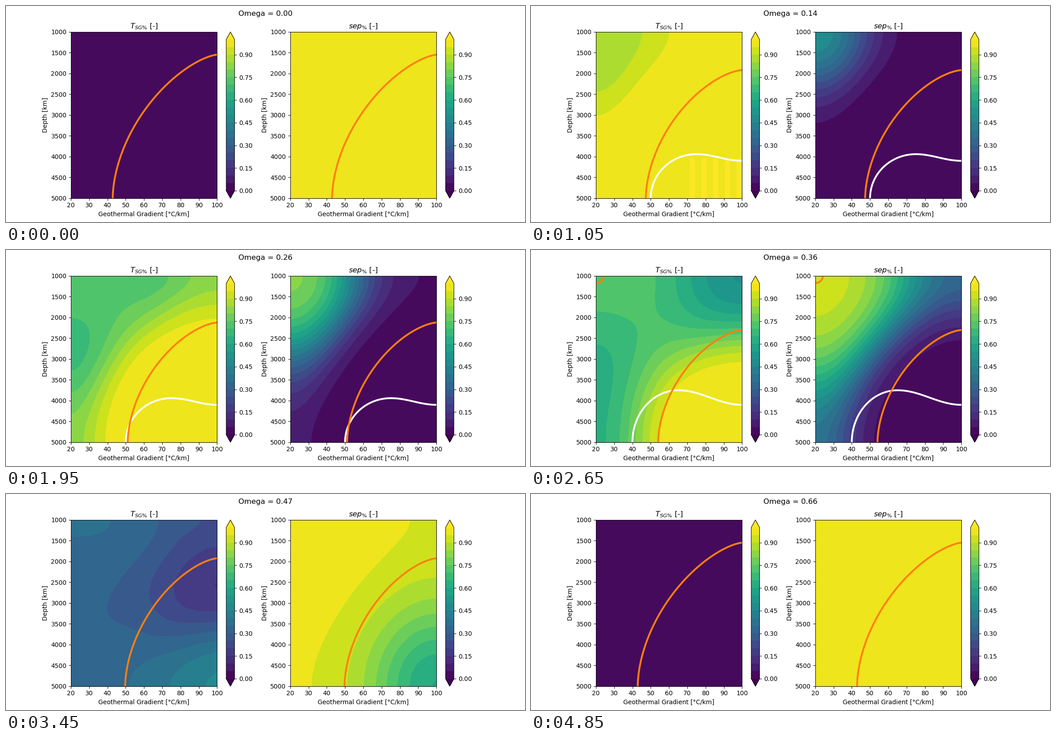
A matplotlib script for the animation above (4950 ms loop, 1159 by 483 pixels).

```python
import numpy as np
import matplotlib.pyplot as plt
from matplotlib.animation import FuncAnimation

DPI = 96.6
STEPS = 98
OMEGA_STEP = 1 / 148
ORANGE = "#ff7f0e"
LEVELS = np.linspace(0, 1, 21)
plt.rcParams["font.size"] = 10.25

u = np.linspace(0, 1, 91)
v = np.linspace(0, 1, 101)
U, V = np.meshgrid(u, v)
G, D = 20 + 80 * U, 1000 + 4000 * V
# Eased coordinates give every surface zero slope at the borders
A, B = (1 - np.cos(np.pi * U)) / 2, (1 - np.cos(np.pi * V)) / 2


def ramp(x, start, end):
    return np.clip((x - start) / (end - start), 0, 1)


def smooth(x, start, end):
    t = ramp(x, start, end)
    return t * t * (3 - 2 * t)


def mix(a, b, t):
    return a + (b - a) * t


def sigmoid(x):
    return 1 / (1 + np.exp(-x))


FLAT = np.full_like(U, 0.02)
residue = U**2 * np.maximum(.092 - .042 * ((1 - V) / .39)**2,
                            .065 - .015 * (V / .0825)**2)
residue = np.maximum(residue, FLAT)
ripple = .01 * np.cos(2 * np.pi * (G - 72.7) / 6.4) * (
    ramp(G, 68, 72) * ramp(D, 3980, 4150))


def fields_at(w, resting):
    """Steam share and separation over the whole map."""
    if resting:
        return FLAT, np.full_like(U, .98)
    score = (12.2 * w - 1.75
             - (4.95 - 2.3 * smooth(w, .2, .45)) * A
             - (6.45 - 9.3 * w) * B
             - 3.7 * A * B)
    early = 4.3 * w - 2.4
    late = .63 - 1.02 * B
    drop = (.265 + .275 * A**2 + .115 * (1 - (1 - B)**3)
            + A * B * mix(early, late, smooth(w, .36, .42)))
    drop = np.maximum(drop, 0) * np.clip(.35 + 2.5 * w, 0, 1)
    share = .997 - drop * sigmoid(score + 10 * w - .3)
    share = share + ripple * (1 - ramp(w, .14, .22))

    leftover = mix(residue, FLAT, ramp(w, .507, .527))
    share = mix(share, leftover, ramp(w, .42, .507))
    return share, sigmoid(mix(score, 4, ramp(w, .42, .5)))


def orange_curve(w, resting):
    back = 1 if resting else ramp(w, .42, .507)
    bottom = mix(42.9 + 31.2 * w, 42.9, back)
    right = mix(np.interp(w, [0, .14, .26, .36, .42],
                          [1690, 1915, 2115, 2305, 2360]),
                1538 + 10 * (resting or ramp(w, .507, .59)), back)
    power = mix(1.55, 1.47, back)
    a = np.linspace(0, np.pi / 2, 120)
    g = 100 - (100 - bottom) * np.sin(a)**(2 / power)
    d = right + (5000 - right) * (1 - np.clip(np.cos(a), 0, 1)**(2 / 1.8))
    return g, d


def corner_arc(w):
    size = ramp(w, .30, .36) * mix(1, 1.25, ramp(w, .36, .42)) * (
        1 - ramp(w, .42, .46))
    if size == 0:
        return [], []
    a = np.linspace(0, np.pi / 2, 30)
    return 20 + 4.3 * size * np.cos(a), 1000 + 178 * size * np.sin(a)


def white_curve(w, resting):
    if resting or w > .4:
        return [], []
    start, peak = (50, 3940) if w < .31 else (40, 3750)
    a = np.linspace(0, np.pi / 2, 60)
    s = np.linspace(0, 1, 60)
    crest = start + 25
    g = np.r_[crest - 25 * np.cos(a), mix(crest, 100, s)]
    d = np.r_[mix(5000, peak, np.sin(a)),
              mix(peak, 4100, (1 - np.cos(np.pi * s)) / 2)]
    return g, d


# The hundredth of a pixel guards against rounding down
fig, axes = plt.subplots(1, 2, figsize=(1159.01 / DPI, 483.01 / DPI), dpi=DPI)
fig.subplots_adjust(right=.8998)
heading = fig.suptitle("Omega = 0.00")


def fill(ax, z):
    return ax.contourf(G, D, z, levels=LEVELS, cmap="viridis", extend="both")


filled, whites, oranges, arcs = [], [], [], []
for ax, title, z in zip(axes, (r"$T_{SG\%}$ [-]", r"$sep_{\%}$ [-]"),
                        fields_at(0, True)):
    ax.set(xlim=(20, 100), ylim=(5000, 1000), title=title,
           xlabel="Geothermal Gradient [°C/km]", ylabel="Depth [km]",
           xticks=range(20, 101, 10), yticks=range(1000, 5001, 500))
    filled.append(fill(ax, z))
    fig.colorbar(filled[-1], ax=ax, ticks=LEVELS[::3], format="%.2f")
    for group, color in ((whites, "white"), (oranges, ORANGE), (arcs, ORANGE)):
        group += ax.plot([], [], color=color, lw=3, solid_capstyle="butt")


def update(frame):
    step = min(frame, STEPS - 1)
    w = step * OMEGA_STEP
    resting = step < 3
    heading.set_text(f"Omega = {w:.2f}")
    for i, z in enumerate(fields_at(w, resting)):
        filled[i].remove()
        filled[i] = fill(axes[i], z)
        whites[i].set_data(*white_curve(w, resting))
        oranges[i].set_data(*orange_curve(w, resting))
        arcs[i].set_data(*corner_arc(w))
    return [heading, *whites, *oranges, *arcs]


anim = FuncAnimation(fig, update, frames=STEPS + 1, interval=50,
                     repeat=True, repeat_delay=0, blit=False)
plt.show()
```
